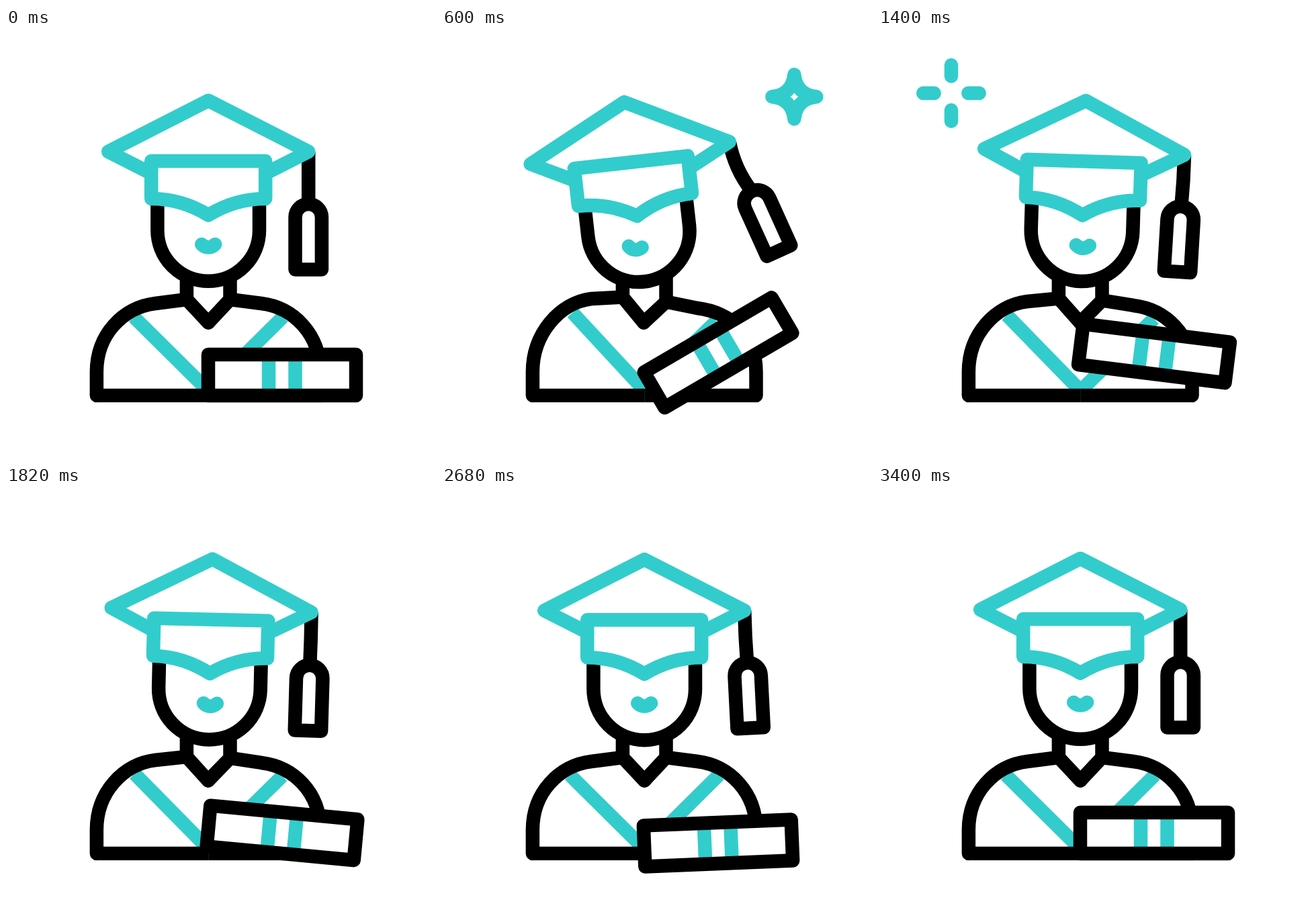
Recreate the animation shown at these times as an HTML page with a canvas. Size 640x640 px, loop 3.6 s.

```html
<!DOCTYPE html>
<html lang="en">
<head>
<meta charset="utf-8">
<title>Graduate</title>
<style>
  html, body { margin: 0; width: 100%; height: 100%; overflow: hidden; background: #fff; }
  canvas { display: block; width: 640px; height: 640px; }
</style>
</head>
<body>
<canvas id="stage" width="640" height="640"></canvas>
<script>
const LOOP = 3600;
const START = 100, END = 3400;
const CX = 301.2, CHIN = 377;
const LINE = 20.5;
const TEAL = '#33cccc';
const BLACK = '#000';
const ctx = document.getElementById('stage').getContext('2d');

const rad = deg => deg * Math.PI / 180;
const clamp = v => Math.max(0, Math.min(1, v));
const ease = (t, from, to) => (1 - Math.cos(Math.PI * clamp((t - from) / (to - from)))) / 2;

// Swings from rest through each turning point in time and back to rest.
function sway(times, values, end = END) {
  const at = [START, ...times, end];
  const to = [0, ...values, 0];
  return t => to.reduce((sum, v, i) => i ? sum + (v - to[i - 1]) * ease(t, at[i - 1], at[i]) : 0, 0);
}

const turns = [740, 1460, 2420];
const headTilt = sway(turns, [-7.2, 1.9, 0]);
const headDrop = sway(turns, [0.8, 0.2, 1.6]);
const shoulderLean = sway(turns, [1.1, 0.4, 0]);
const tasselSwing = sway(turns, [-27.5, 4, -3.5]);
const scrollTilt = sway([850, 1500, 2300], [-40.3, 9.9, -3.2]);
const scrollDrop = sway([960, 2050, 2420], [-53, 6, 20], 3200);

function stroke(path, color, { fill = false, cap = 'butt', join = 'round', width = LINE } = {}) {
  const shape = new Path2D(path);
  if (fill) {
    ctx.fillStyle = '#fff';
    ctx.fill(shape);
  }
  ctx.strokeStyle = color;
  ctx.lineWidth = width;
  ctx.lineCap = cap;
  ctx.lineJoin = join;
  ctx.stroke(shape);
}

function placed(x, y, angle, draw) {
  ctx.save();
  ctx.translate(x, y);
  ctx.rotate(rad(angle));
  draw();
  ctx.restore();
}

// Each side mirrors the other; leaning lifts one shoulder and lowers the other.
function drawBody(lean) {
  const sides = [-1, 1].map(side => ({ x: dx => CX + side * dx, y: (y, k) => y + side * k * lean }));
  for (const { x, y } of sides) {
    stroke(`M${x(111 - 4 * lean)} ${y(430, 6.5)} L${x(-10)} 550`, TEAL);
  }
  for (const { x, y } of sides) {
    stroke(`M${CX} 547 H${x(166.3)} V512 C${x(166.3)} 456 ${x(127)} ${y(416, 7.2)} ${x(79)} ${y(410, 7.2)}
      L${x(32.3)} ${y(404, 3.5)}`, BLACK);
    stroke(`M${x(32.3)} 370 V${y(404, 3.5)} L${CX - lean} 438.5`, BLACK, { cap: 'round' });
  }
  ctx.fillStyle = '#fff';
  ctx.fillRect(CX - 166, 557.4, 333, 12);
}

function drawTassel(swing, length) {
  stroke(`M0 0 Q${swing * 0.4} ${length / 2} 0 ${length}`, BLACK);
  ctx.translate(0, length);
  stroke('M-19.7 97.5 V19.7 A19.7 19.7 0 0 1 19.7 19.7 V97.5 Z', BLACK, { fill: true });
}

function drawHead(t) {
  const tilt = headTilt(t), swing = tasselSwing(t), lean = shoulderLean(t);
  const y = CHIN + headDrop(t);
  const s = Math.sin(rad(tilt)), c = Math.cos(rad(tilt));
  const tip = { x: 149, y: -193 };
  // The string slackens as the tassel falls back.
  const slack = 3 * (swing - tasselSwing(t - 20));

  placed(CX, y, tilt, () =>
    stroke('M-75.8 -127 V-76 A75.8 75.8 0 0 0 75.8 -76 V-127', BLACK, { fill: true }));
  placed(CX + 2.1 * tilt, y - 55 + 3 * lean, 5 * lean, () =>
    stroke('M-10 0 C-4 6 4 6 10 0', TEAL, { cap: 'round' }));
  placed(CX + tip.x * c - tip.y * s, y + tip.x * s + tip.y * c, swing, () =>
    drawTassel(swing, 78 - slack));
  placed(CX, y, tilt, () => {
    stroke(`M-85 -160.5 L${-tip.x} ${tip.y} L0 -269 L${tip.x} ${tip.y} L85 -160.5`, TEAL, { fill: true });
    stroke('M-85 -179 H85 V-123 Q40 -123 0 -98.5 Q-40 -123 -85 -123 Z', TEAL, { fill: true });
  });
}

function drawScroll(t) {
  placed(411, 516.5 + scrollDrop(t), scrollTilt(t), () => {
    ctx.fillStyle = '#fff';
    ctx.fillRect(-110, -30.5, 220, 61);
    stroke('M-20 -30 V30 M19.5 -30 V30', TEAL);
    stroke('M-110 -30.5 H110 V30.5 H-110 Z', BLACK);
  });
}

function drawStar(x, y, age) {
  const u = age / 300;
  if (u <= 0 || u >= 1) return;
  const r = 42 * Math.sin(Math.PI * u) ** 2;
  const k = r * 0.1;
  placed(x, y, 0, () => stroke(
    `M0 ${-r} Q${k} ${-k} ${r} 0 Q${k} ${k} 0 ${r} Q${-k} ${k} ${-r} 0 Q${-k} ${-k} 0 ${-r} Z`,
    TEAL, { width: LINE * Math.min(1, r / 14) }));
}

function drawBurst(x, y, age) {
  const u = age / 360;
  if (u <= 0 || u >= 1) return;
  const outer = 42.5 * (1 - (1 - clamp(u / 0.7)) ** 2.2);
  const inner = Math.min(outer, 42.5 * clamp((u - 0.05) / 0.9));
  const width = LINE * Math.min(1, u * 6, (1 - u) * 6);
  for (let turn = 0; turn < 360; turn += 90) {
    placed(x, y, turn, () => stroke(`M${inner} 0 H${outer + 0.01}`, TEAL, { cap: 'round', width }));
  }
}

function draw(t) {
  ctx.fillStyle = '#fff';
  ctx.fillRect(0, 0, 640, 640);
  drawBody(shoulderLean(t));
  drawHead(t);
  drawScroll(t);
  drawStar(524.3, 102.3, t - 497);
  drawBurst(109, 97, t - 1190);
  drawStar(555, 385.2, t - 2097);
  drawBurst(102.5, 340, t - 2810);
}

function frame() {
  draw(performance.now() % LOOP);
  requestAnimationFrame(frame);
}
frame();
</script>
</body>
</html>
```
